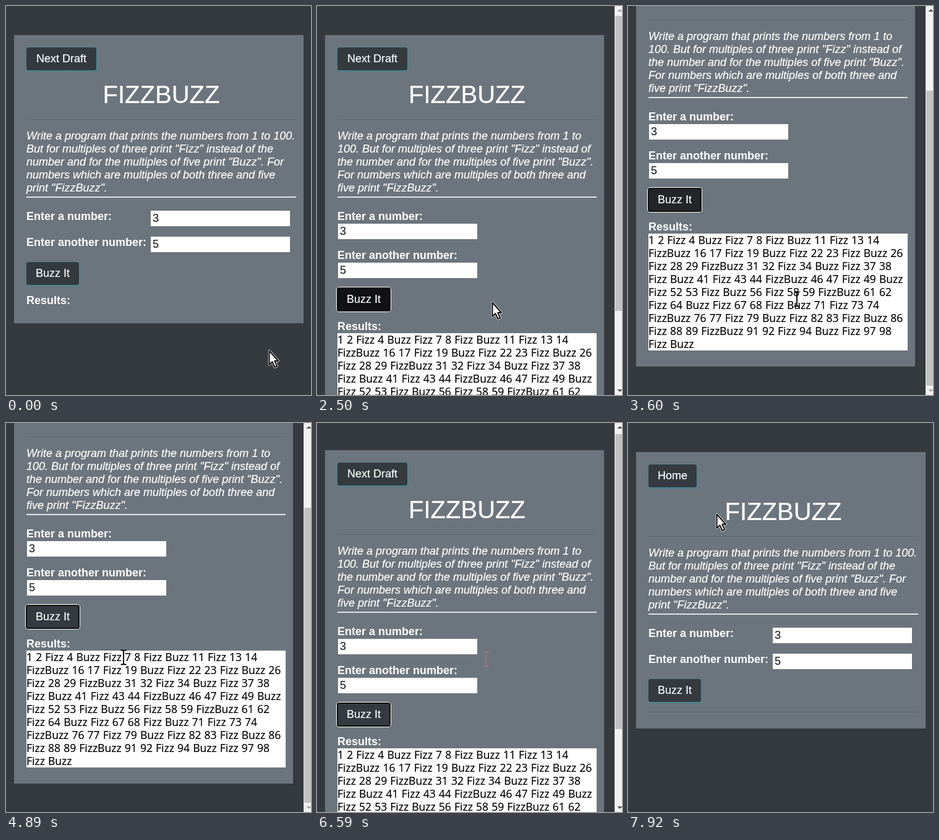
An HTML page that plays this animation: 493 by 629 pixels, repeating every 8 s.

```html
<!DOCTYPE html>
<html lang="en">
<head>
<meta charset="utf-8">
<title>FizzBuzz</title>
<style>
html, body { margin: 0; width: 100%; height: 100%; overflow: hidden; background: #343a40; }
svg { display: block; width: 493px; height: 629px; }
text { font: 18px "Liberation Sans", Arial, sans-serif; fill: #fff; stroke: #fff; stroke-width: .2; white-space: pre; }
.title { font-size: 40px; }
.task { font-style: italic; }
.label { font-weight: bold; stroke: none; }
.value { fill: #212529; stroke: #212529; }
.list { font: 17.5px "Open Sans", "Noto Sans", sans-serif; word-spacing: .6px; fill: #000; stroke: #000; }
</style>
</head>
<body>
<svg id="stage" viewBox="0 0 493 629">
  <defs>
    <filter id="glow" x="-20%" y="-30%" width="140%" height="160%"><feGaussianBlur stdDeviation="1.4"/></filter>
  </defs>
  <g id="view"></g>
</svg>
<script>
const LOOP = 8000;
const view = document.getElementById('view');

const WIDE = {
  right: 469, bottom: 513, inputX: 234, inputs: [331, 373], labels: [346, 388], button: 414, results: 482,
  task: ['Write a program that prints the numbers from 1 to 100.',
    'But for multiples of three print "Fizz" instead of the',
    'number and for the multiples of five print "Buzz". For',
    'numbers which are multiples of both three and five',
    'print "FizzBuzz".']
};
const NARROW = {
  right: 452, bottom: 744, inputX: 34, inputs: [352, 415], labels: [346, 409], button: 456, results: 524,
  task: ['Write a program that prints the numbers from 1 to',
    '100. But for multiples of three print "Fizz" instead of',
    'the number and for the multiples of five print "Buzz".',
    'For numbers which are multiples of both three and',
    'five print "FizzBuzz".']
};
const LIST_TOP = 529, LINE = 21;

const buzz = n => (n % 3 ? '' : 'Fizz') + (n % 5 ? '' : 'Buzz') || String(n);
const starts = [1, 15, 27, 39, 51, 63, 75, 87, 99, 101];
const listLines = starts.slice(0, -1).map((a, i) =>
  Array.from({ length: starts[i + 1] - a }, (_, k) => buzz(a + k)).join(' '));

// Cursor moves: start, end, number of steps, target x, target y
const moves = [
  [450, 1090, 9, 78, 440],
  [2190, 2500, 5, 282, 478],
  [3600, 4140, 8, 76, 387],
  [4290, 4510, 4, 134, 383],
  [4740, 4890, 3, 190, 379],
  [5140, 5290, 3, 245, 381],
  [5520, 5600, 2, 273, 382],
  [6760, 7140, 6, 108, 94],
  [7230, 7310, 2, 105, 90],
  [7830, 7920, 2, 142, 146]
];
// Wheel scrolling: time, offset
const wheel = [[0, 0], [2890, 3], [2960, 55], [3040, 100], [3210, 103], [3280, 132], [3360, 155], [3430, 161],
  [6360, 158], [6430, 100], [6510, 30], [6590, 3], [6680, 0]];
// Cursor shapes: time, shape
const shapes = [[0, 'arrow'], [1010, 'hand'], [2190, 'arrow'], [3600, 'beam'], [6760, 'arrow'], [7230, 'hand'], [7530, 'arrow']];

const at = (track, t) => track.reduce((v, k) => t >= k[0] ? k[1] : v, track[0][1]);
const within = (t, a, b) => t >= a && t < b;
const smooth = p => p * p * (3 - 2 * p);

function stepped(t, a, b, n) {
  if (t < a) return 0;
  return Math.min(n, Math.floor((t - a) * (n - 1) / (b - a) + 1e-6) + 1) / n;
}

function cursorAt(t) {
  let x = 424, y = 556;
  for (const [a, b, n, tx, ty] of moves) {
    const p = smooth(stepped(t, a, b, n));
    x += (tx - x) * p;
    y += (ty - y) * p;
  }
  return [Math.round(x), Math.round(y)];
}

const rect = (x, y, w, h, fill, more = '') =>
  `<rect x="${x}" y="${y}" width="${w}" height="${h}" fill="${fill}" ${more}/>`;
const text = (x, y, str, cls = '', more = '') => `<text x="${x}" y="${y}" class="${cls}" ${more}>${str}</text>`;

function button(y, w, label, { fill = '#343a40', focus = false } = {}) {
  const ring = focus
    ? rect(31.5, y - 1.5, w + 3, 40, 'none', 'rx="4.5" stroke="#fff"') +
      rect(33, y, w, 37, 'none', 'rx="3" stroke="#101010" stroke-width="2"')
    : '';
  const glow = focus ? '' :
    rect(33.3, y + .5, w + .4, 37.2, '#17a2b8', 'rx="4" opacity=".8" filter="url(#glow)"');
  return glow + rect(33, y, w, 37, fill, 'rx="3.5"') + ring +
    text(33 + w / 2, y + 24, label, '', 'text-anchor="middle"');
}

const FADE = '#222629', HOVER = '#0f1112';

function page(t) {
  const home = t >= 7530;
  const narrow = within(t, 1870, 7530);
  const L = narrow ? NARROW : WIDE;
  const w = L.right - 33;
  const rule = y => rect(33, y, w, 1, '#000', 'opacity=".12"');

  let runFill;
  if (within(t, 1010, 1090) || within(t, 3600, 3680)) runFill = FADE;
  else if (within(t, 1090, 3600)) runFill = HOVER;
  const runFocus = within(t, 1790, 7460);
  let navFill;
  if (within(t, 7230, 7310)) navFill = FADE;
  else if (within(t, 7310, 7530)) navFill = HOVER;

  let s = rect(13, 47, L.right - 1, (home ? 494 : L.bottom) - 47, '#6c757d');
  s += home ? button(67, 78, 'Home')
    : button(67, 113, 'Next Draft', { fill: navFill, focus: within(t, 7460, 7530) });
  s += text(33 + w / 2, 157, 'FIZZBUZZ', 'title', 'text-anchor="middle"') + rule(183);
  L.task.forEach((line, i) => s += text(33, 216 + i * LINE, line, 'task'));
  s += rect(33, 308, w, 2, '#dee2e6');
  ['Enter a number:', 'Enter another number:'].forEach((label, i) => {
    s += text(33, L.labels[i], label, 'label');
    s += rect(L.inputX, L.inputs[i], 225, 25, '#fff');
    s += text(L.inputX + 3, L.inputs[i] + 18, 3 + 2 * i, 'value');
  });
  s += button(L.button, 85, 'Buzz It', { fill: runFill, focus: runFocus });
  s += home ? rule(467) : text(33, L.results, 'Results:', 'label');
  if (narrow) {
    s += rect(33, LIST_TOP, w, listLines.length * LINE, '#fff');
    listLines.forEach((line, i) => s += text(33, LIST_TOP + 17 + i * LINE, line, 'list'));
  }
  return s;
}

function scrollbar(scroll) {
  const mark = (y, d, off) => `<path d="M485.5 ${y}h8l-4 ${d}z" fill="${off ? '#a3a3a3' : '#505050'}"/>`;
  return rect(481, 0, 12, 629, '#f1f1f1') +
    rect(482, Math.round(15.5 + scroll * .753), 11, 477, '#c1c1c1') +
    mark(9, -4, scroll === 0) + mark(620, 4, scroll === 161);
}

const ARROW = 'M1.5 1.5V24L6.5 19.3L10.5 28L14.2 26.3L10.3 17.8H16.2Z';
const HAND = 'M-1.5 11V.5Q-1.5-1.5 .3-1.5T2 .5V6Q4.8 5 5.3 7Q7.6 6.3 8 8.2Q10 8 10 10V14.5Q9.6 17 8.3 19.5H.2' +
  'Q-1.5 16.5-3.4 14.2Q-5 11.8-3.8 10.6Q-2.8 10-1.5 12';

function cursor(t, scroll) {
  const [x, y] = cursorAt(t);
  const shape = at(shapes, t);
  let s = '';
  if (within(t, 1790, 1940) || within(t, 7460, 7600))
    s += `<circle cx="${x}" cy="${y}" r="12" fill="#fff000" opacity=".55"/>`;
  s += `<g transform="translate(${x} ${y})" stroke-linejoin="round">`;
  if (shape === 'arrow') {
    s += `<path d="${ARROW}" fill="none" stroke="#fff" stroke-width="3.4"/>` +
      `<path d="${ARROW}" fill="#fff" stroke="#000" stroke-width="1.9"/>`;
  } else if (shape === 'hand') {
    s += `<path d="${HAND}" fill="#fff" stroke="#000" stroke-width="1.2"/>` +
      '<path d="M2 6V10M5.3 7V10.5M8 8.2V11" stroke="#000"/>';
  } else {
    const onList = y > LIST_TOP - scroll;
    s += `<path d="M-4.5-11.5H-2Q0-11.5 0-9.5Q0-11.5 2-11.5H4.5M0-10V10M-4.5 11.5H-2Q0 11.5 0 9.5Q0 11.5 2 11.5H4.5"` +
      ` fill="none" stroke="${onList ? '#000' : '#9a8487'}" stroke-width="${onList ? 1.9 : 1.4}"/>`;
  }
  return s + '</g>';
}

let last = '';
function render(t) {
  const scroll = at(wheel, t);
  const bar = within(t, 1870, 7530) ? scrollbar(scroll) : '';
  const now = rect(0, 0, 493, 629, '#343a40') +
    `<g transform="translate(0 ${-scroll})">${page(t)}</g>` + bar + cursor(t, scroll);
  if (now !== last) view.innerHTML = last = now;
}

const begin = performance.now();
function tick() {
  render((performance.now() - begin) % LOOP);
  requestAnimationFrame(tick);
}
tick();
</script>
</body>
</html>
```
